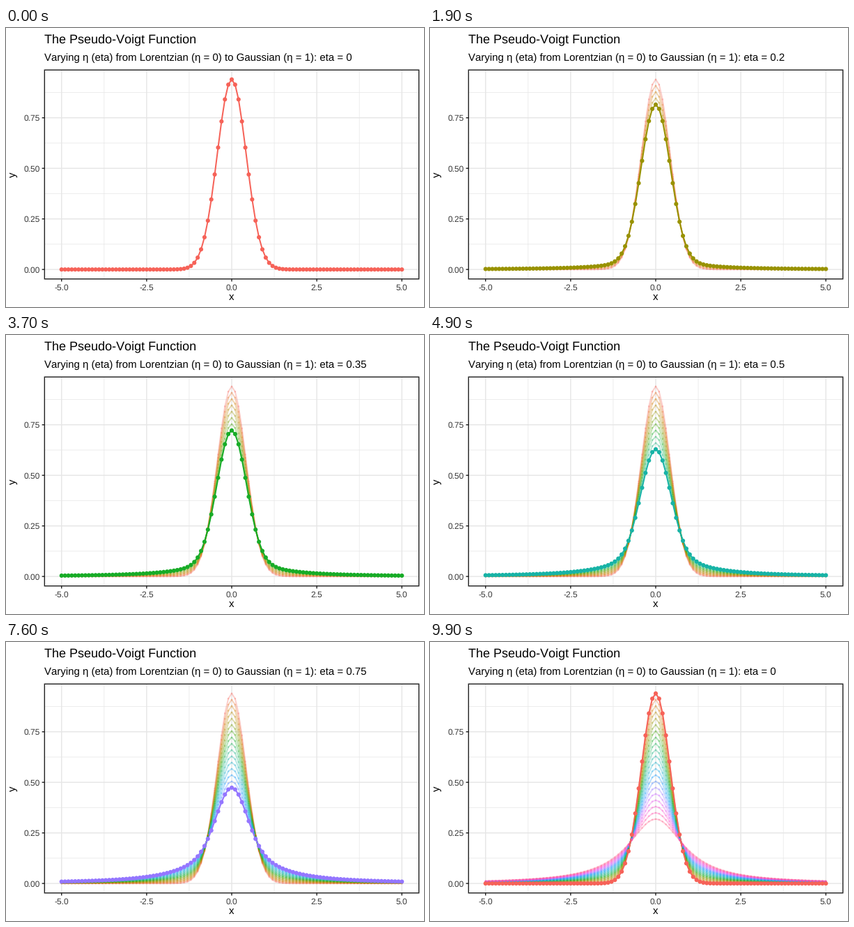
Recreate the animation shown at these times as a matplotlib script. Size 600 by 400 pixels, loop 10000 ms.

```python
import numpy as np
import matplotlib.pyplot as plt
from matplotlib.animation import FuncAnimation
from matplotlib.patches import Rectangle

plt.rcParams.update({
    "font.family": "Liberation Sans",
    "text.hinting": "none",
    "text.kerning_factor": 6,
    "path.snap": False,
    "path.simplify": False,
})

W, H, DPI = 600, 400, 100
PX = 72 / DPI  # points per pixel
LEFT, RIGHT, TOP, BOTTOM = 55.33, 592.67, 60.2, 359.8
X0, X_UNIT = 324, 48.85
Y0, Y_UNIT = 346.2, 290
TITLE, BODY, SMALL = 18, 15, 12  # font sizes in pixels

STATES = 21
FRAMES = 100
SHORT_STATES = (0, 10, 17, 18, 19, 20)
lengths = [4 if k in SHORT_STATES else 5 for k in range(STATES)]
starts = np.concatenate([[0], np.cumsum(lengths)])
holds = [2 if k in (0, 10) else 3 for k in range(STATES)]


def to_x(x):
    return X0 + X_UNIT * x


def to_y(y):
    return Y0 - Y_UNIT * y


def tone(c):
    """Darken mid-tones the way the display profile does."""
    return np.asarray(c) ** 1.25


def grey(level):
    return (float(tone(level)),) * 3


def hue_color(k):
    """Evenly spaced LUV hues with chroma 100 and luminance 65."""
    h = np.radians(15 + 360 * k / STATES)
    lum, chroma = 65, 100
    y = ((lum + 16) / 116) ** 3
    u = chroma * np.cos(h) / (13 * lum) + 0.1978
    v = chroma * np.sin(h) / (13 * lum) + 0.4683
    x = 9 * y * u / (4 * v)
    z = -x / 3 - 5 * y + 3 * y / v
    rgb = np.array([[3.2405, -1.5371, -0.4985],
                    [-0.9693, 1.8760, 0.0416],
                    [0.0556, -0.2040, 1.0572]]) @ [x, y, z]
    rgb = np.clip(rgb, 0, 1)
    rgb = np.where(rgb > 0.0031308, 1.055 * rgb ** (1 / 2.4) - 0.055, 12.92 * rgb)
    rgb = tone(np.clip(rgb, 0, 1))
    rgb[0] = max(rgb[0], 0.09)
    return tuple(rgb)


def pseudo_voigt(x, eta):
    gauss = 2 * np.sqrt(np.log(2) / np.pi) * np.exp(-4 * np.log(2) * x ** 2)
    lorentz = 1 / (np.pi * (1 + x ** 2))
    return (1 - eta) * gauss + eta * lorentz


fig = plt.figure(figsize=(W / DPI, H / DPI), dpi=DPI, facecolor="white")
ax = fig.add_axes([0, 0, 1, 1])
ax.set_xlim(0, W)
ax.set_ylim(H, 0)
ax.axis("off")


def segment(xs, ys, color, width, z):
    ax.plot(xs, ys, color=color, lw=width * PX, solid_capstyle="butt", zorder=z)


def text(x, y, s, size, color="black", **kw):
    return ax.text(x, y, s, fontsize=size * PX, color=color,
                   va="baseline", zorder=9, **kw)


def grid_x(x, width):
    segment([to_x(x)] * 2, [TOP, BOTTOM], grey(0.92), width, 1)


def grid_y(y, width):
    segment([LEFT, RIGHT], [to_y(y)] * 2, grey(0.92), width, 1)


for x in (-3.75, -1.25, 1.25, 3.75):
    grid_x(x, 0.71)
for y in (0.125, 0.375, 0.625, 0.875):
    grid_y(y, 0.71)
for x in (-5, -2.5, 0, 2.5, 5):
    grid_x(x, 1.42)
    segment([to_x(x)] * 2, [BOTTOM, BOTTOM + 3.67], grey(0.2), 1.42, 8)
    text(to_x(x), 375.9, f"{x:.1f}", SMALL, grey(0.3), ha="center")
for y in (0, 0.25, 0.5, 0.75):
    grid_y(y, 1.42)
    segment([LEFT - 3.67, LEFT], [to_y(y)] * 2, grey(0.2), 1.42, 8)
    text(48.7, to_y(y) + 4.3, f"{y:.2f}", SMALL, grey(0.3), ha="right")

ax.add_patch(Rectangle((LEFT, TOP), RIGHT - LEFT, BOTTOM - TOP, fill=False,
                       ec=grey(0.2), lw=1.42 * PX, zorder=8))
text(LEFT, 21, "The Pseudo-Voigt Function", TITLE)
subtitle = text(LEFT, 47, "", BODY)
text(X0, 389.8, "x", BODY, ha="center")
text(15, 210, "y", BODY, ha="center", rotation=90, rotation_mode="anchor")

xs = np.linspace(-5, 5, 101)
px = to_x(xs)
etas = np.arange(STATES) / 20
curves = [to_y(pseudo_voigt(xs, eta)) for eta in etas]
colors = [hue_color(k) for k in range(STATES)]


def line_and_dots(y, color, radius, alpha, z):
    line, = ax.plot(px, y, color=color, lw=2 * PX, alpha=alpha, zorder=z,
                    solid_capstyle="butt")
    # One size per dot keeps sub-pixel positions.
    sizes = np.full(len(px), (2 * radius * PX) ** 2)
    dots = ax.scatter(px, y, s=sizes, color=color, linewidths=0,
                      alpha=alpha, zorder=z + 2)
    return line, dots


shadows = [line_and_dots(y, c, 1.3, 0.3, 3) for y, c in zip(curves, colors)]
line, dots = line_and_dots(curves[0], colors[0], 3.05, 1, 4)


def update(n):
    step = int(np.searchsorted(starts, n, side="right")) - 1
    state = step % STATES
    marked = step
    if step < STATES and n >= starts[step] + holds[step]:
        marked += 1
    for k, pair in enumerate(shadows):
        for artist in pair:
            artist.set_visible(k < marked)
    line.set_ydata(curves[state])
    dots.set_offsets(np.column_stack([px, curves[state]]))
    for artist in (line, dots):
        artist.set_color(colors[state])
    subtitle.set_text("Varying η (eta) from Lorentzian (η = 0) to Gaussian (η = 1): "
                      f"eta = {etas[state]:g}")
    return []


anim = FuncAnimation(fig, update, frames=FRAMES, interval=100,
                     repeat=True, repeat_delay=0)
plt.show()
```
